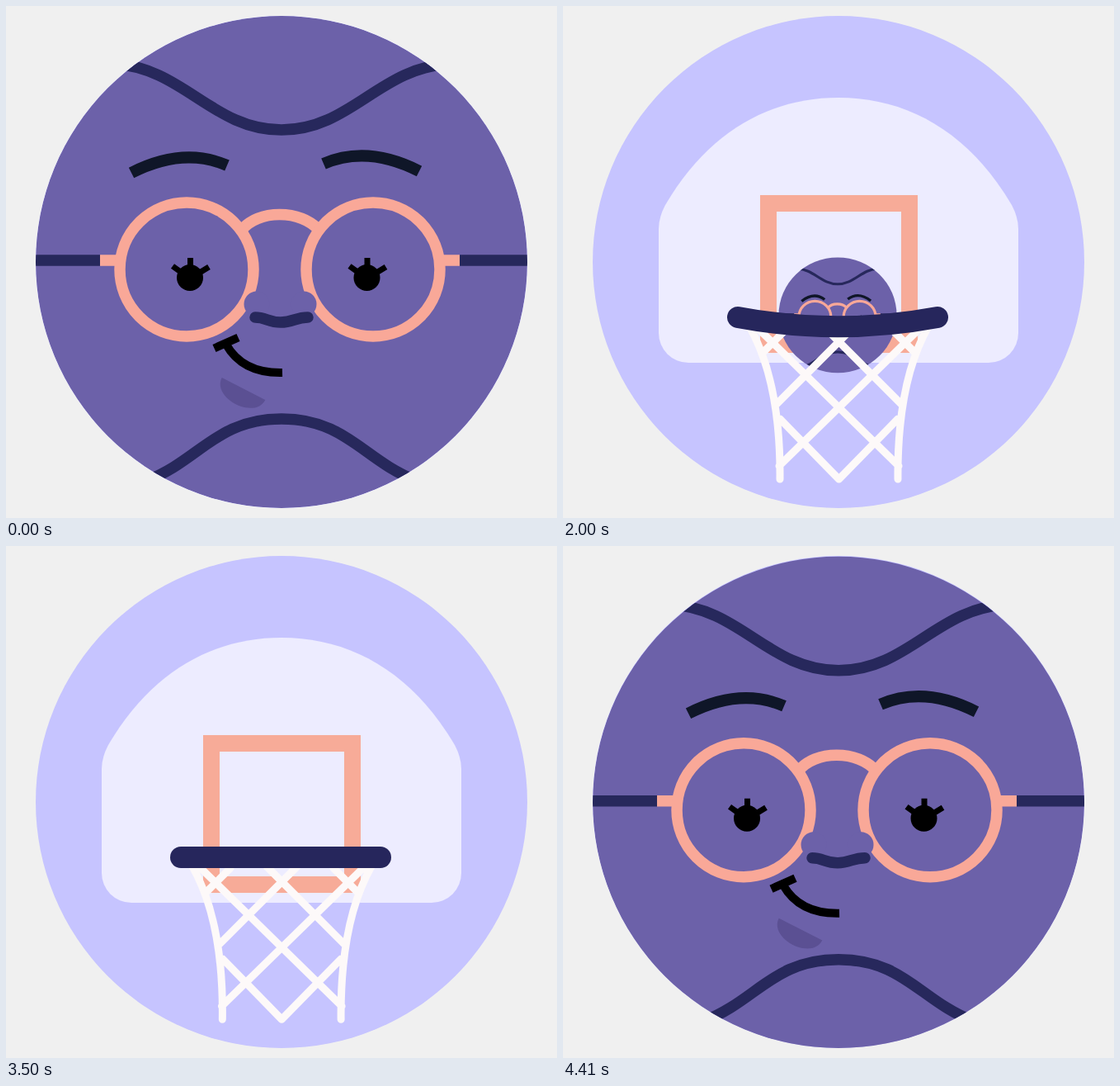
An HTML page that plays this animation: 668 px wide and 620 px high, repeating every 4.5 s.

```html
<!DOCTYPE html>
<html lang="en">
<head>
<meta charset="utf-8">
<title>Swish</title>
<style>
  html, body { margin: 0; width: 100%; height: 100%; overflow: hidden; background: #f0f0f0; }
  svg { display: block; }
  .line { fill: none; stroke: #27285c; stroke-width: 13.5; }
  .rim { fill: none; stroke: #f9a898; stroke-width: 13.5; }
  .ink { fill: none; stroke: #000; stroke-width: 10; }
  .skin { fill: #6c61a9; }
  #brow { fill: none; stroke: #0f1628; stroke-width: 14; }
  #net { fill: none; stroke: #fdf9f9; stroke-width: 9; stroke-linecap: round; stroke-linejoin: round; }
  #hoop { fill: none; stroke: #26265c; stroke-width: 26; stroke-linecap: round; }
  #word { font: 900 123px Inter, "Open Sans", sans-serif; letter-spacing: -0.01em; text-anchor: middle; fill: #fff; }
</style>
</head>
<body>
<svg width="668" height="620" viewBox="0 0 668 620">
  <defs>
    <clipPath id="disc"><circle cx="334" cy="310" r="298"/></clipPath>
  </defs>
  <circle cx="334" cy="310" r="298" fill="#c6c4ff"/>
  <path fill="#edecff" d="M116 270Q116 256 124 241C177 151 252 111 334 111S491 151 544 241Q552 256 552 270V396A36 36 0 0 1 516 432H152A36 36 0 0 1 116 396Z"/>
  <rect x="249" y="239" width="171" height="171" fill="none" stroke="#f7ab98" stroke-width="20"/>
  <g id="scene" clip-path="url(#disc)">
    <path id="net"/>
    <path id="hoop"/>
    <g id="ball">
      <circle class="skin" cx="334" cy="310" r="298"/>
      <g clip-path="url(#disc)">
        <path class="line" d="M130 70C215 74 250 150 334 150S453 74 538 70"/>
        <path class="line" d="M170 575C235 550 255 500 334 500S433 550 498 575"/>
        <path class="line" d="M30 308H114M550 308H640"/>
      </g>
      <path class="rim" d="M114 308H136M528 308H550M285 272C305 246 358 246 380 272"/>
      <circle class="rim" cx="219" cy="319" r="81"/>
      <circle class="rim" cx="445" cy="319" r="81"/>
      <g id="features">
        <path id="brow"/>
        <use href="#brow" transform="translate(653 -2) scale(-1 1)"/>
        <circle class="skin" cx="304" cy="361" r="15.5"/>
        <circle class="skin" cx="361" cy="361" r="15.5"/>
        <path class="line" stroke-linecap="round" d="M302 377C315 377 318 383 333 383S351 377 366 377"/>
        <g id="eyes">
          <g id="eye">
            <circle cx="223" cy="329" r="16"/>
            <path d="M223.500 305V329M202 315L223 330L246 316" fill="none" stroke="#000" stroke-width="7"/>
          </g>
          <use href="#eye" x="214.500"/>
        </g>
        <path id="squint" class="ink" stroke-linejoin="round" d="M209 320L244 335L211 350M455 315L420 331L455 346"/>
      </g>
      <path id="chin" fill="#5b5093" d="M-29.500 0H29.500C29.500 28 -29.500 28 -29.500 0Z"/>
      <path id="smile" class="ink"/>
      <ellipse id="gasp" cx="330" cy="420" rx="18.500" ry="17"/>
      <path id="laugh" d="M302 410H376C376 458 302 458 302 410Z"/>
    </g>
  </g>
  <svg id="banner" y="232" height="119">
    <rect width="100%" height="100%" fill="#26265c"/>
    <text id="word">SWISH</text>
  </svg>
</svg>
<script>
const $ = id => document.getElementById(id);
const set = (id, name, value) => $(id).setAttribute(name, value);
const show = (id, on) => set(id, 'visibility', on ? 'visible' : 'hidden');
const clamp = t => Math.min(1, Math.max(0, t));
const lerp = (a, b, t) => a + (b - a) * t;
const bend = (a, b, c, t) => lerp(lerp(a, b, t), lerp(b, c, t), t);
const curve = ([a, b, c, d, e, f]) => `M${a} ${b}Q${c} ${d} ${e} ${f}`;

// The picture moves twelve times a second; all times below are in these steps
const LOOP = 4500, STEPS = 54;
const CROUCH = 2, TOSS = 9, DROP = 17, SWISH = 24, RISE = 31, EXIT = 37;
const SMALL = 0.24;

// brow: heights of outer end, bend and inner end; chin: x, y, angle
const calm = { brow: [202, 170, 193], look: [0, 0], eye: [0], chin: [288, 463.5, 27],
  mouth: [267, 410, 287, 445, 335, 444], tick: [1] };
const worry = { brow: [196, 192, 165], look: [0, -1], eye: [12], chin: [332, 462, 0],
  mouth: [312, 420, 330, 428, 348, 420], tick: [0] };
const glee = { ...worry, brow: [238, 188, 230], look: [0, 0], eye: [0], chin: [342, 470, 0] };
const up = { brow: [214, 182, 205], look: [-4.5, -5], eye: [-43], chin: [308.5, 464.5, 2],
  mouth: [284, 441, 306, 464, 343, 455], tick: [0] };

const moods = [
  { start: CROUCH, length: 5, from: calm, to: worry },
  { start: TOSS, length: 4, from: worry, to: glee },
  { start: RISE, length: 10, from: glee, to: up },
  { start: 45, length: 4, from: up, to: calm }
];

function mood(f) {
  const m = moods.filter(m => f >= m.start).pop() || moods[0];
  const t = clamp((f - m.start) / m.length), pose = {};
  for (const key in m.from) pose[key] = m.from[key].map((v, i) => lerp(v, m.to[key][i], t));
  return pose;
}

function drawFace(f) {
  const { brow, look, eye, chin, mouth, tick } = mood(f);
  const happy = f >= 12 && f < RISE, gasp = f >= 6 && f < 12;
  set('brow', 'd', curve([152, brow[0], 215, brow[1], 268, brow[2]]));
  set('features', 'transform', `translate(${look})`);
  set('eyes', 'transform', `translate(0 ${eye})`);
  set('chin', 'transform', `translate(${chin[0]} ${chin[1]}) rotate(${chin[2]})`);
  const [x, y] = mouth, dx = 14.5 * tick, dy = 6.5 * tick;
  set('smile', 'd', curve(mouth) + `M${x - dx} ${y - 2 + dy}L${x + dx} ${y - 2 - dy}`);
  show('eyes', !happy);
  show('squint', happy);
  show('laugh', happy);
  show('gasp', gasp);
  show('smile', !happy && !gasp);
}

function ballAt(f) {
  if (f < TOSS) {
    const t = clamp((f - CROUCH) / (TOSS - CROUCH));
    return { x: 334, y: 310 - 43 * t + 90 * Math.sin(Math.PI * t), size: 1, turn: 0 };
  }
  if (f < DROP) {
    const t = (f - TOSS) / (DROP - TOSS);
    return { x: bend(334, 149, 209, t), y: bend(267, 126, 180, t),
      size: lerp(1, SMALL, 1 - (1 - t) ** 2), turn: -27.5 * t };
  }
  if (f < RISE) {
    const n = f - DROP, t = clamp(n / 7);
    return { x: bend(209, 285, 333, t), y: 180 + 16 * n + 0.24 * n ** 3,
      size: SMALL, turn: lerp(-27.5, 0, n / 7) };
  }
  const gap = 123 * 1.9 ** (45 - f);
  return { x: 334 + 4 * clamp(gap / 123), y: 310 + gap, size: 1, turn: 0 };
}

function drawBall(f) {
  const { x, y, size, turn } = ballAt(f);
  const squash = 1 - 0.043 * clamp((y - 310) / 123);
  set('ball', 'transform',
    `translate(${x} ${y}) rotate(${turn}) scale(${size} ${size * squash}) translate(-334 -310)`);
  // Falls behind the net, otherwise in front of everything
  $('scene').insertBefore($('ball'), f >= DROP && f < RISE ? $('net') : null);
}

const cords = [
  [[226, 388], [264, 455], [263, 573]],
  [[236, 390], [407, 557]],
  [[316, 388], [410, 482]],
  [[263, 500], [334.5, 573]],
  [[272, 390], [241, 421]]
];
const net = cords.concat(cords.map(c => c.map(([x, y]) => [669 - x, y])));

function drawNet(f) {
  // Damped swing after the ball drops through
  const n = Math.max(0, f - SWISH);
  const wave = -Math.exp(-n / 4.5) * Math.sin(Math.PI * n / 2.8);
  const warp = ([x, y]) => {
    const k = ((y - 388) / 185) ** 2 * wave;
    return [x - (x - 334.5) * 0.31 * k + 15 * k, y - 15 * k];
  };
  set('net', 'd', net.map(c => {
    const p = c.map(warp).flat();
    return p.length > 4 ? curve(p) : `M${p[0]} ${p[1]}L${p[2]} ${p[3]}`;
  }).join(''));
  const sag = 13 * Math.sin(Math.PI * clamp((f - 22) / 3));
  set('hoop', 'd', curve([212, 377, 333, 377 + 2 * sag, 454, 377]));
}

function drawBanner(f) {
  const out = Math.max(0, f - EXIT);
  const left = 86 + 4 * (f - 29) + 30 * out ** 2;
  const right = 580 - 46 * 0.53 ** (f - 29) + 8 * out;
  const width = Math.max(0, right - left);
  set('banner', 'x', left);
  set('banner', 'width', width);
  set('word', 'transform', `translate(${width / 2 - 15} 103.5) skewX(-9.5)`);
}

let last = -1;
function play(now) {
  const f = Math.floor((now % LOOP + 7) / LOOP * STEPS) % STEPS;
  if (f !== last) {
    last = f;
    [drawNet, drawFace, drawBall, drawBanner].forEach(draw => draw(f));
  }
  requestAnimationFrame(() => play(performance.now()));
}
play(0);
</script>
</body>
</html>
```
